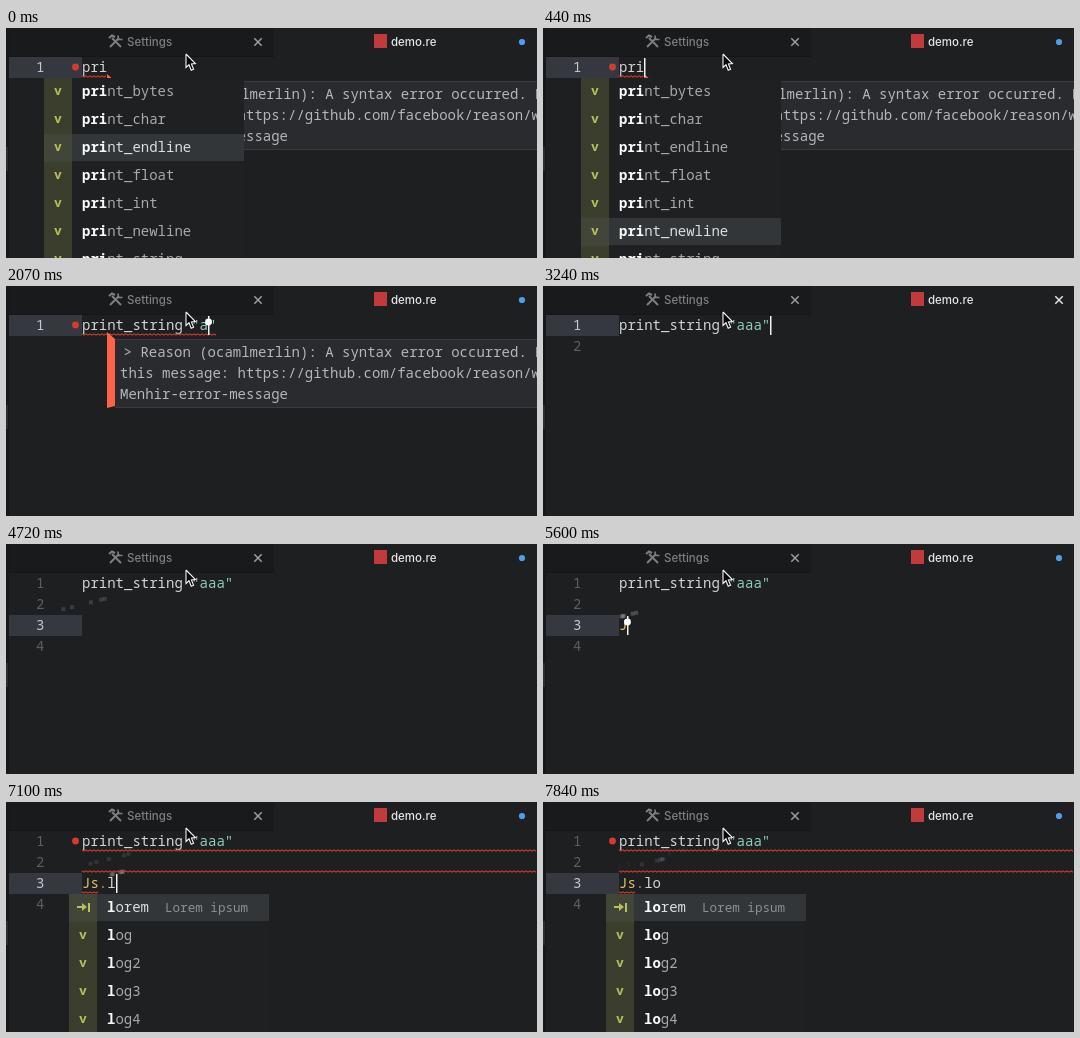
An HTML page with a canvas for the animation above (7990 ms loop, 531 px wide and 230 px high).

```html
<!DOCTYPE html>
<html lang="en">
<head>
<meta charset="utf-8">
<style>
  html, body { margin: 0; width: 100%; height: 100%; overflow: hidden; background: #1d1f21; }
  canvas { display: block; }
</style>
</head>
<body>
<canvas id="stage" width="531" height="230"></canvas>
<script>
const ctx = document.getElementById("stage").getContext("2d");
const LOOP = 7990, STEP = 148;
const CHAR = 8.4, LEFT = 76, LINE = 21, ROW = 28;
const MONO = '"Noto Sans Mono", "DejaVu Sans Mono", monospace';
const SANS = 'Inter, "Open Sans", sans-serif';
const RED = "#d63c2e", TEAL = "#8fccb8", PLAIN = "#d2d4d6", GOLD = "#e5c068", MUTED = "#a6a9ac";

const col = n => LEFT + n * CHAR;
const rowTop = line => 29 + (line - 1) * LINE;
const baseline = line => rowTop(line) + 15;

// Last value whose start time has been reached.
function pick(t, steps) {
  let value = steps[0][1];
  for (const [start, v] of steps) if (t >= start) value = v;
  return value;
}

function box(x, y, w, h, color) {
  ctx.fillStyle = color;
  ctx.fillRect(x, y, w, h);
}

function disc(x, y, r, color) {
  ctx.fillStyle = color;
  ctx.beginPath();
  ctx.arc(x, y, r, 0, Math.PI * 2);
  ctx.fill();
}

function stroke(points, color, width = 1) {
  ctx.strokeStyle = color;
  ctx.lineWidth = width;
  ctx.beginPath();
  points.forEach(([x, y]) => ctx.lineTo(x, y));
  ctx.stroke();
}

function polygon(points, fill) {
  ctx.fillStyle = fill;
  ctx.beginPath();
  points.forEach(([x, y]) => ctx.lineTo(x, y));
  ctx.closePath();
  ctx.fill();
}

function text(str, x, y, color, { size = 14, weight = 500, family = MONO } = {}) {
  ctx.font = `${weight} ${size}px ${family}`;
  ctx.fillStyle = color;
  ctx.fillText(str, x, y);
}

function cross(x, y, color) {
  stroke([[x - 3.7, y - 3.7], [x + 3.7, y + 3.7]], color, 1.5);
  stroke([[x + 3.7, y - 3.7], [x - 3.7, y + 3.7]], color, 1.5);
}

function squiggle(x1, x2, line) {
  const y = rowTop(line) + 19.5, points = [];
  for (let x = x1, i = 0; x <= x2; x += 2, i++) points.push([x, y + (i % 2 ? 0.7 : -0.7)]);
  stroke(points, RED, 1.1);
}

function tabs(modified) {
  box(0, 0, 268, 28, "#191a1c");
  box(0, 0, 3, 230, "#17181a");
  box(0, 119, 2, 24, "#2b2d31");
  box(3, 28, 265, 1, "#151618");
  const gray = "#7d7f82";
  stroke([[106, 10], [115, 19]], gray, 2);
  stroke([[113, 10], [104, 19]], gray, 2);
  stroke([[103, 10], [106, 7.5], [109, 9]], gray, 2);
  stroke([[112, 7.5], [112.5, 11.5], [116.5, 11.5]], gray, 1.6);
  text("Settings", 121, 18, "#7d7f82", { size: 11.5, family: SANS });
  cross(252, 14, "#9b9da0");
  box(368, 6, 13, 14, "#c13b3d");
  text("demo.re", 385, 18, "#e4e5e6", { size: 11.5, family: SANS });
  if (modified) disc(516, 14, 3.1, "#4f9ee8");
  else cross(516, 14, "#e4e5e6");
}

function gutter(count, active) {
  box(3, rowTop(active), 73, LINE, "#363840");
  for (let n = 1; n <= count; n++) {
    text(String(n), 30, baseline(n), n === active ? "#c3c5c8" : "#5b5e63");
  }
}

function errorDot(line) {
  disc(69.5, rowTop(line) + 10, 3.4, RED);
}

function tooltip(line, lines, x, right = 540) {
  const y = rowTop(line) + 24, h = lines.length * LINE + 6;
  box(x, y, right - x, h, "#3a3c41");
  box(x + 1, y + 1, right - x - 2, h - 2, "#292b2f");
  box(x, y, 8, h, "#1d1f21");
  polygon([[x, y - 7], [x + 8, y], [x + 8, y + h - 2], [x, y + h]], "#ff6347");
  lines.forEach((str, i) => text(str, x + (i ? 13 : 16.6), y + 18 + i * LINE, "#b4b6b9"));
}

function cube(x, y) {
  const c = "#9a78b0";
  stroke([[x - 6, y - 3], [x - 1, y - 5], [x + 6, y - 3], [x + 6, y + 3], [x + 1, y + 5],
          [x - 6, y + 3], [x - 6, y - 3], [x + 1, y - 1], [x + 6, y - 3]], c, 1.1);
  stroke([[x + 1, y - 1], [x + 1, y + 5]], c, 1.1);
}

function snippetIcon(x, y) {
  const c = "#b9bf5c";
  stroke([[x - 6, y], [x + 2, y]], c, 2);
  polygon([[x - 1, y - 4], [x + 4, y], [x - 1, y + 4]], c);
  stroke([[x + 6, y - 4], [x + 6, y + 5]], c, 2);
}

function popup({ x, line, items, bold, selected, kind, hint, scrollbar }) {
  const top = rowTop(line) + LINE, w = 200;
  box(x, top, w, 230 - top, "#1f2022");
  items.forEach((item, i) => {
    const y = top + i * ROW, mid = y + 13, chosen = i === selected;
    if (chosen) box(x, y, w, ROW - 1, "#333639");
    const tint = kind === "module" ? ["#38333f", "#443d4c"] : ["#3b3e2c", "#424639"];
    box(x, y, 28, ROW, tint[chosen ? 1 : 0]);
    if (kind === "module") cube(x + 14, mid);
    else if (hint && i === 0) snippetIcon(x + 14, mid);
    else text("v", x + 10, mid + 4, "#b9bf5c", { weight: 700, size: 13 });
    text(item.slice(0, bold), x + 38, mid + 5, "#f8f9fa", { weight: 700 });
    text(item.slice(bold), x + 38 + bold * CHAR, mid + 5, chosen ? "#dcdee0" : MUTED);
    if (hint && i === 0) {
      text(hint, x + 54 + item.length * CHAR, mid + 5, "#8c8f92", { size: 12.6 });
    }
  });
  if (scrollbar) {
    ctx.fillStyle = "#414347";
    ctx.beginPath();
    ctx.roundRect(x + 194, top + 2, 4, 107, 2);
    ctx.fill();
  }
}

// Keystrokes after the first save: time, column, line.
const bursts = [[4280, 0, 3], [5460, 1, 3], [5760, 2, 3], [6500, 3, 3], [6950, 4, 3], [7240, 5, 3]];

function debris(t) {
  const now = Math.round(t / STEP) * STEP;
  bursts.forEach(([born, column, line], b) => {
    const age = (now - born) / 1000;
    if (age < 0 || age > 1) return;
    for (let i = 0; i < 5; i++) {
      const n = Math.abs(Math.sin((b * 5 + i + 1) * 12.99) * 437.58) % 1;
      const x = col(column) + (n - 0.5) * 100 * age;
      const y = rowTop(line) + 6 - (45 + 25 * n) * age + 35 * age * age;
      ctx.globalAlpha = 0.3 * (1 - age);
      box(x, y, 4, 4, "#c5c7c9");
    }
  });
  ctx.globalAlpha = 1;
}

function caret(t, column, line) {
  const visible = pick(t, [[0, 0], [290, 1], [740, 0], [1180, 1], [3390, 0], [3840, 1],
    [4720, 0], [5020, 1], [7690, 0]]);
  if (!visible) return;
  const x = Math.round(col(column));
  box(x, rowTop(line) + 1, 1.5, 19, "#f0f1f2");
  const struck = [1180, 1930, 2070, 2360, 2510, 5460, 5760, 6500, 6950, 7240]
    .some(k => t >= k && t < k + 145);
  if (struck) disc(x + 0.5, rowTop(line) + 7, 3.4, "#ffffff");
}

function mouse(x, y) {
  const shape = [[x, y], [x, y + 13.5], [x + 3, y + 10.8], [x + 5.2, y + 16.2],
    [x + 7.6, y + 15.2], [x + 5.4, y + 10], [x + 9.4, y + 9.6]];
  polygon(shape, "#050505");
  stroke([...shape, shape[0]], "#f5f5f5", 1.1);
}

const syntaxError = [
  "> Reason (ocamlmerlin): A syntax error occurred. Help us improve",
  "this message: https://github.com/facebook/reason/wiki/Add-a-",
  "Menhir-error-message",
];
const printers = ["bytes", "char", "endline", "float", "int", "newline", "string"].map(s => "print_" + s);
const modules = ["Js", "Js_vector", "Js_unsafe", "Js_undefined", "Js_types"];
const loggers = ["lorem", "log", "log2", "log3", "log4"];

function render(t) {
  box(0, 0, 531, 230, "#1d1f21");
  const saved = t >= 2960 && t < 3990;
  const count = pick(t, [[0, 1], [2960, 2], [3990, 3], [4280, 4]]);
  const active = pick(t, [[0, 1], [3990, 2], [4280, 3]]);
  const call = t < 1180 ? "pri" : "print_string";
  const string = pick(t, [[0, ""], [1930, '""'], [2070, '"a"'], [2360, '"aa"'], [2510, '"aaa"']]);
  const third = pick(t, [[0, ""], [5460, "J"], [5760, "Js"], [6500, "Js."], [6950, "Js.l"], [7240, "Js.lo"]]);

  tabs(!saved);
  gutter(count, active);
  debris(t);

  text(call, LEFT, baseline(1), PLAIN);
  text(string, col(13), baseline(1), TEAL);
  text(third.slice(0, 2), LEFT, baseline(3), GOLD);
  text(third.slice(2, 3), col(2), baseline(3), "#c98f5a");
  text(third.slice(3), col(3), baseline(3), PLAIN);

  if (t < 2960) {
    const end = call.length + (string ? string.length + 1 : 0);
    errorDot(1);
    squiggle(LEFT, col(end), 1);
    tooltip(1, syntaxError, 101);
  } else if (t >= 6050) {
    errorDot(1);
    if (t < 7090) {
      squiggle(LEFT, col(12), 1);
      squiggle(LEFT, col(Math.min(third.length, 3)), 3);
      errorDot(3);
      if (t < 6350) tooltip(3, ["> Reason (ocamlmerlin): Error: Unbound value J"], 93, 503);
      else tooltip(3, ["> Reason (ocamlmerlin): Error: Unbound constructor Js"], 101);
    } else {
      squiggle(LEFT, 531, 1);
      squiggle(LEFT, 531, 2);
      squiggle(LEFT, col(2), 3);
    }
  }

  if (t < 1180) {
    const selected = pick(t, [[0, 2], [150, 3], [290, 4], [440, 5], [740, 6]]);
    popup({ x: 38, line: 1, items: printers, bold: 3, selected });
  } else if (t >= 6350 && t < 6650) {
    popup({ x: 38, line: 3, items: modules, bold: 2, selected: 0, kind: "module", scrollbar: true });
  } else if (t >= 6950) {
    popup({ x: 63, line: 3, items: loggers, bold: third.length - 3, selected: 0, hint: "Lorem ipsum" });
  }

  const column = active === 1
    ? pick(t, [[0, 3], [1180, 12], [1630, 13], [1930, 14], [2070, 15], [2360, 16], [2510, 17], [2660, 18]])
    : third.length;
  caret(t, column, active);
  mouse(180, 26);
}

const start = performance.now();
function tick() {
  render((performance.now() - start) % LOOP);
  requestAnimationFrame(tick);
}
tick();
</script>
</body>
</html>
```
